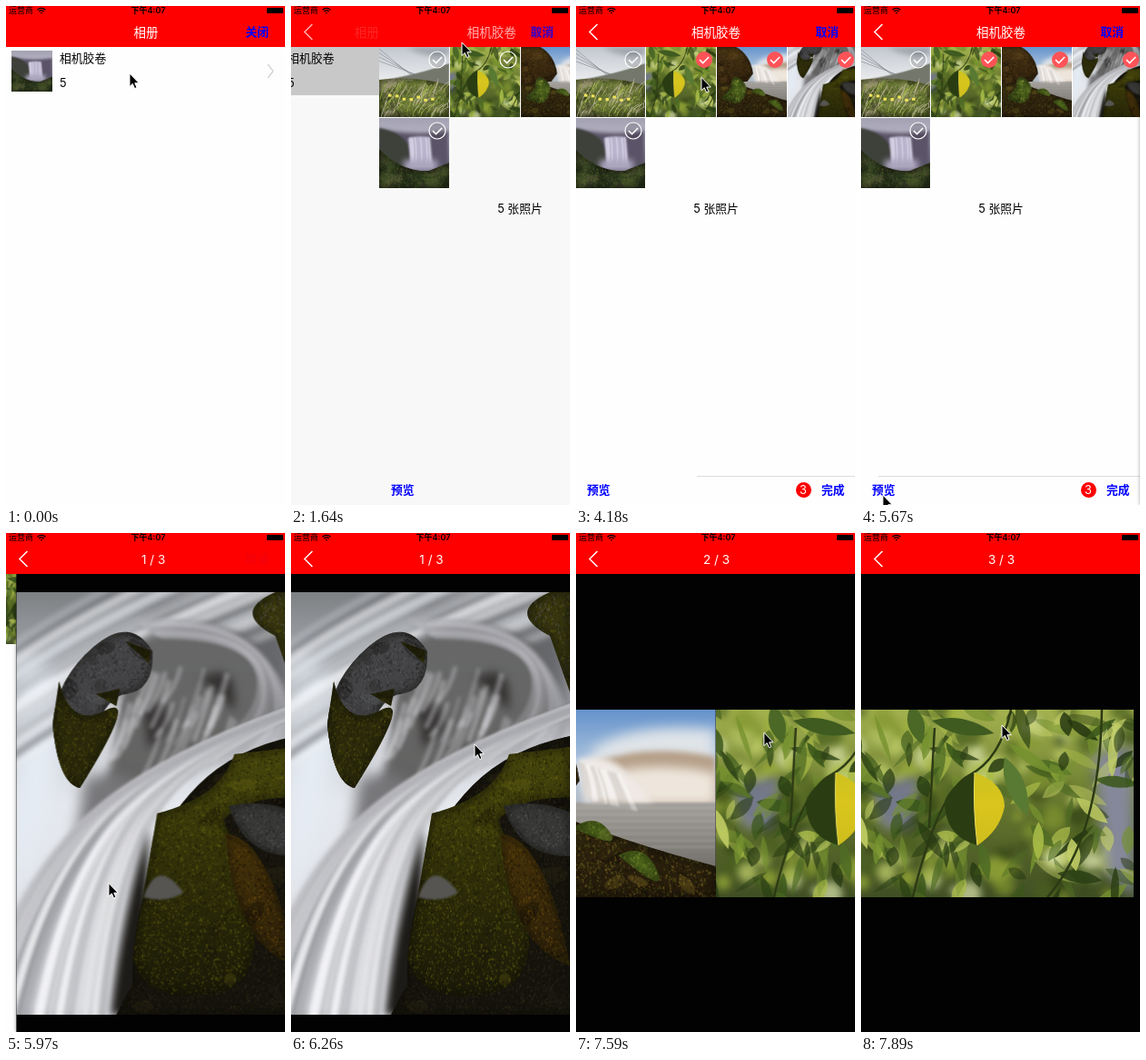
An HTML page with a canvas that plays this animation: 307x548 px, repeating every 8000 ms.

```html
<!DOCTYPE html>
<html lang="zh">
<head>
<meta charset="utf-8">
<title>相册</title>
<style>
html, body { margin: 0; width: 100%; height: 100%; overflow: hidden; background: #fefefe; }
#stage { position: relative; width: 307px; height: 548px; overflow: hidden;
  font: 12.8px/20px Inter, 'Noto Sans CJK SC', 'Noto Sans CJK', sans-serif; color: #000; }
#stage * { position: absolute; }
.screen { inset: 0; background: #fefefe; }
.moving .screen { background: #f8f8f8; }
.t { left: calc(var(--x) * 1px); top: calc(var(--y) * 1px - 10px); white-space: nowrap; }
.mid { transform: translateX(-50%); }
.link { color: #00f; font-weight: 600; }
#row { left: 0; top: 45px; width: 307px; height: 53px; }
.moving #row { background: #c8c8c8; }
#viewer { background: #020202; box-shadow: 0 0 4px rgba(0, 0, 0, .35); }
#nav { left: 0; top: 0; width: 307px; height: 45px; background: #fe0000; }
#nav .title { color: #fff; font-size: 13.5px; }
#nav .status { font-size: 9px; }
#battery { left: 287px; top: 1.5px; width: 17.5px; height: 6.5px; border-radius: 1px; background: #000; }
#rule { top: 516px; right: 0; height: 1px; background: #dcdcdc; }
#badge { left: 241.5px; top: 523px; width: 17px; height: 17px; border-radius: 50%;
  background: #fe0000; color: #fff; text-align: center; line-height: 17px; }
svg { overflow: visible; fill: none; }
.check circle { fill: rgba(0, 0, 0, .12); stroke: #fff; stroke-width: 1.2; }
.check path { stroke: #fff; stroke-width: 1.5; }
.check.on circle { fill: #ff5358; stroke: none; }
#cursor { left: 0; top: 0; }
</style>
</head>
<body>
<div id="stage">
  <div class="screen" id="list">
    <div id="row"></div>
    <span class="t" style="--x:59;--y:58">相机胶卷</span>
    <span class="t" style="--x:59;--y:85">5</span>
    <svg width="307" height="98"><path d="M288 64l6 7.5-6 7.5" stroke="#b8b8bc"/></svg>
  </div>
  <div class="screen" id="grid">
    <span class="t mid" style="--x:154;--y:223">5 张照片</span>
    <div id="rule"></div>
    <span class="t link" style="--x:12;--y:532">预览</span>
    <span class="t link" style="--x:270;--y:532">完成</span>
    <div id="badge"></div>
  </div>
  <div class="screen" id="viewer"><div id="strip"></div></div>
  <div id="nav">
    <span class="t status" style="--x:3;--y:5">运营商</span>
    <svg width="50" height="12" stroke="#000" stroke-width="1.3">
      <path d="M34.500 4.200q4.500-3.600 9 0M36.300 6q2.700-2.200 5.400 0M38.200 7.600h1.600"/>
    </svg>
    <span class="t mid status" style="--x:156.500;--y:5;font-weight:600">下午4:07</span>
    <div id="battery"></div>
    <svg id="back" width="30" height="45"><path d="M23.500 20l-8.500 8.500 8.500 8.500" stroke="#fff" stroke-width="1.5"/></svg>
    <span class="t mid title" id="listTitle" style="--y:28.500">相册</span>
    <span class="t mid title" id="gridTitle" style="--y:28.500">相机胶卷</span>
    <span class="t mid title" id="pager" style="--y:29"></span>
    <span class="t link" id="close" style="--x:263.500;--y:28.500">关闭</span>
    <span class="t link" id="cancel" style="--x:263.500;--y:28.500">取消</span>
  </div>
  <svg id="cursor" width="12" height="18">
    <path d="M0 0V14.500L3.300 11.400 5.600 16.600 8 15.600 5.800 10.700H10.300Z" fill="#000" stroke="#fff"/>
  </svg>
</div>
<script>
const W = 307, $ = id => document.getElementById(id);

// ---- Pictures: a few soft shapes plus seeded grain ----
let seed = 7;
const rnd = (a = 0, b = 1) => {
  seed = (seed * 1664525 + 1013904223) % 4294967296;
  return a + (b - a) * seed / 4294967296;
};
const pick = list => list[Math.floor(rnd() * list.length)];
const repeat = (n, fn) => { for (let i = 0; i < n; i++) fn(i / n); };

function picture(w, h, draw) {
  const cv = document.createElement('canvas');
  cv.width = w;
  cv.height = h;
  const c = cv.getContext('2d');
  const soft = (blur, paint) => {
    c.filter = blur ? `blur(${blur}px)` : 'none';
    paint();
    c.filter = 'none';
  };
  const pen = {
    c,
    fade(...colors) {
      const g = c.createLinearGradient(0, 0, 0, h);
      colors.forEach((v, i) => g.addColorStop(i / (colors.length - 1), v));
      return g;
    },
    fill(d, style, blur = 0) {
      c.fillStyle = style;
      soft(blur, () => c.fill(new Path2D(d)));
    },
    line(d, style, width, blur = 0) {
      c.strokeStyle = style;
      c.lineWidth = width;
      soft(blur, () => c.stroke(new Path2D(d)));
    },
    // Rough ground: broad light and shade, fine grain, dark rim.
    rough(d, style, colors, size = 2) {
      const path = new Path2D(d);
      pen.fill(d, style);
      c.save();
      c.clip(path);
      repeat(70, () => {
        c.globalAlpha = .3;
        c.fillStyle = pick([...colors, '#0a0804']);
        c.beginPath();
        c.ellipse(rnd(0, w), rnd(0, h), size * rnd(3, 9), size * rnd(2, 5), rnd(-1, 1), 0, 7);
        c.fill();
      });
      c.globalAlpha = .45;
      repeat(w * h / (size * size * 2), () => {
        c.fillStyle = pick(colors);
        c.fillRect(rnd(0, w), rnd(0, h), rnd(.4, 1) * size, rnd(.6, 1.6) * size);
      });
      c.globalAlpha = .6;
      pen.line(d, '#0b0a06', size * 3, size * 2);
      c.restore();
    },
    leaf(x, y, len, angle, wide, style) {
      c.save();
      c.translate(x, y);
      c.rotate(angle);
      pen.fill(`M0 0Q${len * .45} ${-wide} ${len} 0Q${len * .45} ${wide} 0 0Z`, style);
      c.restore();
    }
  };
  draw(pen);
  return cv;
}

const meadow = picture(154, 154, ({ c, fade, fill, line, rough }) => {
  fill('M0 0H154V154H0Z', fade('#c3c8d0', '#eceeef', '#dfe2e2'));
  fill('M60 0H154V16Q110 28 60 0Z', '#a0a4ac', 6);
  fill('M154 36Q90 60 0 74V100H154Z', '#74776c', 1);
  rough('M0 72Q80 62 154 84V154H0Z', fade('#a6a98a', '#7c8744', '#4d5a22'), ['#8fa045', '#5b6b28', '#a6a47c', '#36421a', '#b8a69c'], 3);
  repeat(60, () => line(`M${rnd(0, 154)} ${rnd(95, 160)}q${rnd(0, 10)} -15 ${rnd(8, 28)} ${rnd(-40, -18)}`,
    pick(['#a7b94e', '#566b25', '#c7bda8']), 1.2));
  repeat(4, i => line(`M0 ${4 + i * 36}L${70 + i * 20} 62`, '#777b80', 1));
  c.fillStyle = '#f0e45c';
  repeat(7, i => c.fillRect(20 + i * 110, rnd(94, 120), 7, 6));
});

const leaves = picture(W, 206, ({ c, fade, fill, line, leaf }) => {
  fill(`M0 0H${W}V206H0Z`, fade('#a5b350', '#66772e', '#404f24'));
  c.globalAlpha = .7;
  c.filter = 'blur(4px)';
  repeat(140, () => {
    c.fillStyle = pick(['#a2b53b', '#c9d670', '#4a6020', '#2f4014', '#81952f', '#dde5ae']);
    c.beginPath();
    c.arc(rnd(0, W), rnd(0, 206), rnd(4, 15), 0, 7);
    c.fill();
  });
  c.globalAlpha = 1;
  fill('M262 50L307 40V206L278 180Z', '#85889a', 7);
  fill('M20 85L70 72 62 130 30 130Z', '#74798a', 6);
  repeat(150, () => {
    c.globalAlpha = rnd(.4, .9);
    leaf(rnd(-20, W), rnd(-20, 200), rnd(22, 60), rnd(.1, 2.6), rnd(6, 15),
      pick(['#4f6c24', '#2a3f14', '#233610', '#75912f', '#a9bb48', '#c3cf66', '#3a571a']));
  });
  c.globalAlpha = 1;
  line('M172 0Q160 55 126 72Q92 90 64 206M82 130L88 20M212 206Q270 140 272 0', '#2c3a14', 2.5);
  leaf(85, 12, 70, .2, 17, '#3f5b20');
  leaf(62, -5, 44, 1.3, 18, '#4b6826');
  leaf(165, 52, 70, 1.2, 20, '#587a32');
  fill('M132 69Q92 92 100 112Q104 140 135 149Z', '#2a3d12');
  fill('M132 69Q164 80 165 106Q160 133 135 149Q130 108 132 69Z', fade('#b7bd27', '#d9c51d', '#c4b51d'));
  line('M132 69Q130 108 135 149', '#eadd62', 1);
});

const lagoon = picture(W, 206, ({ fade, fill, line, rough }) => {
  fill(`M0 0H${W}V206H0Z`, fade('#6593cc', '#b8cbe0', '#aaa8a5', '#74726e'));
  fill('M170 45Q210 14 307 22V72H170Z', '#dfe4e8', 7);
  fill('M172 58Q235 36 307 52V104H172Z', '#b59f88', 3);
  fill('M205 66Q260 58 307 70V104H205Z', '#eee6dc', 6);
  fill('M80 102H307V190H80Z', fade('#b4b1ad', '#a3a09c', '#5e5b55'), 1);
  repeat(7, i => line(`M110 ${108 + i * 50}H307`, 'rgba(215,212,205,.2)', 2, 1));
  fill('M153 55Q190 45 212 72T240 101H162Q158 75 153 55Z', '#efeae6', 3);
  repeat(18, i => line(`M${156 + i * 48} ${58 + i * 14}q6 12 ${7 + i * 12} 40`, pick(['#b9b3ac66', '#ffffff88']), 2, 1));
  rough('M0 0H108Q150 25 157 78L140 102Q80 100 0 150Z', fade('#4a3515', '#2b1e0c', '#1a1208'),
    ['#6a5022', '#1f1507', '#3c2c11', '#86692e', '#120c04']);
  rough('M0 118Q80 95 150 122T307 172V206H0Z', fade('#3b3415', '#332a10', '#241a0b'),
    ['#75691f', '#9a7f2a', '#3a2b10', '#130d05', '#4a5517', '#1b1308']);
  const bush = ['#8fa838', '#5f7b20', '#b4c24c', '#3c5217'];
  rough('M92 120Q94 78 114 90T138 122Q130 170 100 164T66 148Z', '#465a1a', bush, 3);
  rough('M150 130Q175 112 190 134T150 130ZM200 160Q228 145 242 176T200 160Z', '#506a1c', bush);
});

const rapids = picture(W, 464, ({ fade, fill, line, rough }) => {
  fill(`M0 0H${W}V464H0Z`, fade('#7e8184', '#b9bcc2', '#e6e9ee', '#e3e5ea', '#b5b6ba'));
  fill('M130 0H307V150H200Z', '#66676a', 12);
  fill('M0 70Q60 70 50 160T0 330Z', '#e4ebf3', 10);
  repeat(50, () => {
    const y = rnd(-30, 110);
    line(`M-20 ${y + 95}Q90 ${y + 10} 330 ${y - 80}`, pick(['#e3e7ec77', '#5d626755', '#f4f5f766']), rnd(2, 9), 3);
  });
  fill('M112 70C160 28 225 26 268 60Q310 120 252 172Q180 200 80 250Q120 180 112 70Z', fade('#68696a', '#636261', '#4a4745'), 5);
  fill('M140 130Q165 105 168 150L145 172ZM202 95Q245 70 240 130ZM155 195L200 172 190 200Z', '#363433', 5);
  repeat(26, i => line(`M${130 + i * 30} ${32 + i * 18}Q${250 + i * 18} ${20 + i * 30} ${290 - i * 24} 100T${240 - i * 60} 185`,
    pick(['#dcdee344', '#8f909244']), rnd(2, 6), 2));
  repeat(34, i => line(`M${100 + i * 145} ${rnd(80, 150)}q-6 25 -20 ${rnd(30, 65)}`, '#e6e7eb66', rnd(2, 6), 2));
  fill('M75 205Q110 190 135 215T62 300Z', '#77777a', 8);
  fill('M307 135Q190 180 145 255T108 464H0V350Q70 240 140 220T307 135Z', '#d5d7dc', 6);
  repeat(90, () => {
    const s = rnd();
    line(`M320 125Q${178 - s * 40} 185 ${148 - s * 85} 262T${110 - s * 160} 480`,
      pick(['#f4f5f977', '#a4a6ac55', '#ffffff77', '#7c7f8444']), rnd(2, 9), 2);
  });
  const stone = ['#626365', '#303032', '#515154', '#222'];
  const moss = ['#575510', '#242409', '#3d3e0c', '#17160a', '#6b6714'];
  rough('M40 145Q44 95 85 60T150 65Q152 108 120 112T70 215Q46 210 40 145Z', '#434345', stone);
  rough('M40 145L47 98Q60 150 98 130T70 215Q46 210 40 145ZM88 112L114 106 110 125ZM120 54L148 64 146 78Z', '#2b2a0b', moss);
  rough('M307 0H285Q235 22 285 48L307 110Z', '#36350f', [...stone, ...moss]);
  fill('M146 260Q118 340 104 464H140Z', '#1d1b18', 4);
  rough('M307 158Q240 172 200 212T150 300Q126 370 128 430L110 464H307Z', '#15130c', ['#242117', '#0f0e0a', '#333019']);
  rough('M240 178Q225 225 155 243Q140 330 128 400Q140 455 220 440T228 250Q250 225 307 225V170Z',
    fade('#45450e', '#4a490d', '#2f2f09', '#161508'), moss);
  rough('M230 265Q280 270 307 410Q240 390 230 265Z', fade('#4f380a', '#4f380a', '#20180a'), ['#76520d', '#2d1f08', '#4c4510', '#150f06']);
  rough('M234 235Q270 226 307 242V290Q250 290 234 235Z', '#383837', stone);
  fill('M140 335Q155 290 184 330Q165 342 140 335Z', '#565552', 1);
});

const gorge = picture(154, 154, ({ fade, fill, line, rough }) => {
  fill('M0 0H154V154H0Z', fade('#a3a2b2', '#bdbaca', '#746d86', '#4c4a50'));
  fill('M0 24Q80 40 154 28V115H0Z', '#5b5468', 4);
  fill('M0 22Q90 40 60 110H0Z', '#3e413a', 2);
  fill('M64 44Q84 38 112 42L118 108H70Z', '#cbc6dc', 2);
  repeat(15, i => line(`M${67 + i * 45} 42q4 30 2 62`, pick(['#eeebf688', '#8d86a488']), 1.5, 1));
  fill('M54 92H128V116H54Z', '#aaa4bd', 7);
  rough('M0 68Q50 120 110 116L154 98V154H0Z', fade('#41502a', '#41502a', '#25301a'), ['#54682b', '#2a3918', '#65703a', '#1d2814', '#574c3c'], 3);
});

// ---- Layout ----
function place(parent, photo, x, y, w, h) {
  const cv = document.createElement('canvas'), { width, height } = photo;
  const side = Math.min(width, height);
  cv.width = w;
  cv.height = h;
  cv.style.cssText = `left:${x}px;top:${y}px`;
  const c = cv.getContext('2d');
  c.imageSmoothingQuality = 'high';
  if (w === h) c.drawImage(photo, (width - side) / 2, (height - side) / 2, side, side, 0, 0, w, h);
  else c.drawImage(photo, 0, 0, w, h);
  parent.append(cv);
}

place($('list'), gorge, 6, 49, 45, 45);
const checks = [meadow, leaves, lagoon, rapids, gorge].map((photo, i) => {
  const x = -1 + i % 4 * 78, y = 45 + Math.floor(i / 4) * 78;
  place($('grid'), photo, x, y, 77, 77);
  $('grid').insertAdjacentHTML('beforeend',
    `<svg class="check" style="left:${x + 63.5}px;top:${y + 13.5}px" width="1" height="1">
      <circle r="9"/><path d="M-5 0l3.600 3.600 6.600-6.600"/></svg>`);
  return $('grid').lastElementChild;
});
[rapids, lagoon, leaves].forEach((photo, i) =>
  place($('strip'), photo, i * W, 297 - photo.height / 2, W, photo.height));

// ---- Motion, in ticks of the stepped clock ----
const LOOP = 8000, TICK = 148.9;
const OPEN = 10.05, FIRST_PICK = 18, PICK_GAP = 4, PREVIEW = 38;
// Pointer trips: from tick, to tick, x, y
const TRIPS = [
  [0, 1, 135, 73], [10, 11, 188, 40], [11, 16, 291, 62], [17, 19, 220, 66], [22, 25, 142, 62],
  [27, 36, 24, 537], [38, 42, 202, 232], [42, 44, 232, 230], [45, 48, 189, 226],
  [48, 50, 225, 222], [50, 53, 155, 211]
];
const span = (k, from, length) => Math.min(1, Math.max(0, (k - from) / length));
const glide = (k, from, length) => 1 - (1 - span(k, from, length)) ** 3;

function pointer(k) {
  let x = 136, y = 74;
  for (const [from, to, nx, ny] of TRIPS) {
    const s = span(k, from, to - from), e = s * s * (3 - 2 * s);
    x += (nx - x) * e;
    y += (ny - y) * e;
  }
  return [x, y];
}

const shift = (el, x, y = 0) => el.style.transform = `translate(${x}px,${y}px)`;
const show = (el, on) => el.style.display = on ? '' : 'none';
function title(el, x, alpha) {
  el.style.setProperty('--x', x);
  el.style.opacity = alpha;
}

function render(k) {
  const p = glide(k, OPEN, 3), q = glide(k, PREVIEW, 3);
  const swipe = W * glide(k, 46, 4.5) + (W + 7) * glide(k, 50.5, 2.5);
  const [x, y] = pointer(k);

  $('stage').classList.toggle('moving', p > 0 && p < 1);
  shift($('list'), -.3 * W * p);
  shift($('grid'), W * (1 - p) - .3 * W * q);
  shift($('viewer'), W * (1 - q));
  shift($('strip'), -swipe);
  shift($('cursor'), x, y);
  show($('grid'), p > 0);
  show($('viewer'), k >= PREVIEW);

  title($('listTitle'), 154 - 104 * p, (1 - p) ** 1.7);
  title($('gridTitle'), 154 + 209 * (1 - p) - 104 * q, p * (1 - q) ** 1.7);
  title($('pager'), 154.5 + 209 * (1 - q), q);
  $('pager').textContent = `${1 + Math.round(swipe / W)} / 3`;
  $('back').style.opacity = p;
  $('close').style.opacity = 1 - p;
  $('cancel').style.opacity = p * (1 - q);

  // Picks run from the fourth photo back to the second.
  const age = k - FIRST_PICK;
  const count = Math.min(3, Math.max(0, 1 + Math.floor(age / PICK_GAP)));
  const since = age - (count - 1) * PICK_GAP;
  checks.forEach((el, i) => el.classList.toggle('on', i < 4 && i > 3 - count));
  show($('badge'), count);
  show($('rule'), count);
  $('badge').textContent = count;
  $('badge').style.transform = `scale(${1 + .18 * Math.sin(since * Math.PI / 2) * Math.exp(1 - since)})`;
  $('rule').style.left = Math.min(217, x - 5) + 'px';
}

const start = performance.now();
function loop() {
  render(Math.floor(((performance.now() - start) % LOOP + 4) / TICK));
  requestAnimationFrame(loop);
}
loop();
</script>
</body>
</html>
```
